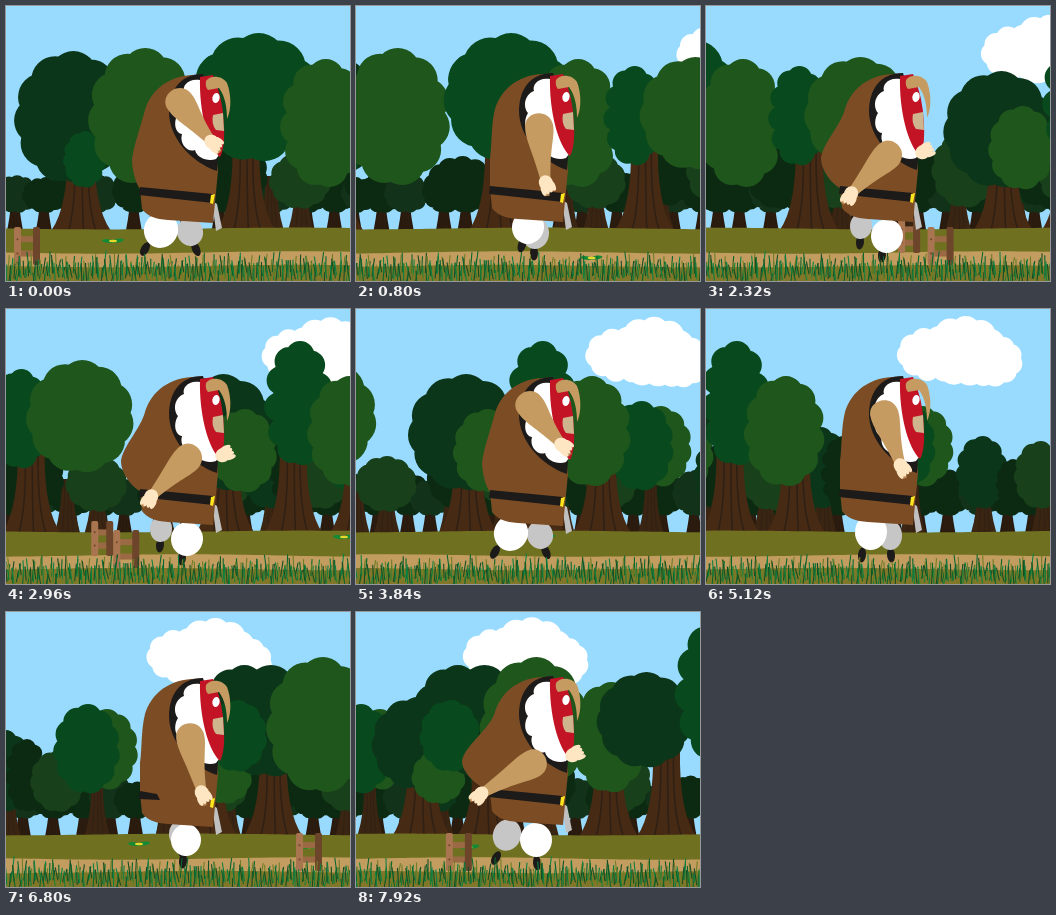
An HTML page with a canvas for the animation above (8 s loop, 344x275 px).

```html
<!DOCTYPE html>
<html lang="en">
<head>
<meta charset="utf-8">
<title>Walking gnome</title>
<style>
html, body { margin: 0; width: 100%; height: 100%; overflow: hidden; background: #99dbff; }
canvas { display: block; }
</style>
</head>
<body>
<canvas id="stage" width="344" height="275"></canvas>
<script>
const g = document.getElementById('stage').getContext('2d');
const W = 344, H = 275, LOOP = 8000, STEP = 80, POSE_MS = 78.6;
const DARK = '#0b3619', GREEN = '#084a1d', LEAF = '#1f561c', SHADE = '#0c2a12', MOSS = '#18401a';
const BROWN = '#7c4d25', TAN = '#c69b62', SKIN = '#ffe6c2', BLACK = '#1d1a1a';

// repeatable random numbers in 0..1
const rnd = n => { const v = Math.sin(n * 127.1 + 11.7) * 43758.5453; return v - Math.floor(v); };

function path(d, color) { g.fillStyle = color; g.fill(new Path2D(d)); }

function oval(x, y, rx, ry, color, turn = 0) {
  g.fillStyle = color;
  g.beginPath();
  g.ellipse(x, y, rx, ry, turn, 0, 7);
  g.fill();
}

// scalloped cloud shape filling the given box
function blob(x0, x1, y0, y1, color) {
  const cx = (x0 + x1) / 2, cy = (y0 + y1) / 2, rx = (x1 - x0) / 2, ry = (y1 - y0) / 2;
  const r = Math.min(rx, ry) * 0.42;
  g.fillStyle = color;
  g.beginPath();
  g.ellipse(cx, cy, rx - r * 0.6, ry - r * 0.6, 0, 0, 7);
  for (let i = 0; i < 11; i++) {
    const a = i * Math.PI * 2 / 11 - 1.5;
    const x = cx + Math.cos(a) * (rx - r), y = cy + Math.sin(a) * (ry - r);
    g.moveTo(x + r, y);
    g.arc(x, y, r, 0, 7);
  }
  g.fill();
}

function trunk(x, w, top, color) {
  const b = 225;
  path(`M${x - w * .45} ${top}L${x + w * .45} ${top}Q${x + w * .4} 200 ${x + w} ${b}L${x - w} ${b}Q${x - w * .4} 200 ${x - w * .45} ${top}Z`, color);
  g.strokeStyle = '#2f2015';
  g.lineWidth = w > 15 ? 1.5 : .7;
  for (const k of [-.25, .05, .3]) {
    g.beginPath();
    g.moveTo(x + k * w * .8, top);
    g.quadraticCurveTo(x + k * w * .6, 195, x + k * w * 1.6, b - 2);
    g.stroke();
  }
}

// canopies: left, right, top, bottom, colour (positions at time zero)
const frontTrees = [
  [8, 122, 45, 178, DARK], [57, 100, 125, 182, GREEN], [82, 192, 42, 180, LEAF],
  [188, 245, 45, 130, DARK], [185, 315, 27, 156, GREEN], [274, 362, 53, 182, LEAF],
  [345, 405, 60, 160, GREEN], [381, 489, 51, 164, LEAF],
  [520, 632, 65, 182, DARK], [565, 632, 100, 184, LEAF], [619, 688, 32, 157, GREEN], [662, 743, 67, 178, LEAF],
  [981, 1070, 85, 178, DARK], [1021, 1110, 53, 165, DARK], [1021, 1075, 138, 192, LEAF],
  [1034, 1149, 53, 165, DARK], [1029, 1090, 88, 160, GREEN], [1089, 1198, 45, 181, LEAF],
  [1181, 1257, 70, 181, LEAF], [1206, 1302, 60, 156, DARK], [1284, 1370, 8, 150, GREEN]
];
const frontTrunks = [75, 240, 386, 580, 648, 714, 1031, 1096, 1218, 1276];
const midTrees = [
  [125, 195, 150, 205, SHADE], [200, 262, 135, 203, SHADE], [263, 325, 147, 203, MOSS],
  [335, 395, 135, 200, SHADE], [385, 452, 125, 202, MOSS], [437, 495, 118, 200, DARK],
  [467, 509, 127, 200, SHADE], [492, 547, 138, 200, MOSS], [535, 600, 97, 178, LEAF],
  [515, 582, 92, 182, GREEN], [602, 654, 127, 200, DARK], [642, 675, 150, 200, SHADE], [660, 712, 132, 200, MOSS],
  [705, 765, 140, 202, SHADE], [780, 840, 138, 200, MOSS]
];
const midTrunks = [265, 295, 360, 412, 470, 559, 630, 690, 735, 810];

function forest(shift, trees, trunks, w, top, color) {
  g.save();
  g.translate(-shift, 0);
  const near = (a, b) => b > shift - 40 && a < shift + W + 40;
  trunks.filter(x => near(x, x)).forEach(x => trunk(x, w, top, color));
  trees.filter(t => near(t[0], t[1])).forEach(t => blob(...t));
  g.restore();
}

const backTrees = [], backTrunks = [];
for (let i = 0; i < 28; i++) {
  const x = i * 29 - 20 + rnd(i) * 10, top = 160 + rnd(i + 50) * 13;
  backTrees.push([x, x + 46, top, 207, i % 3 ? SHADE : '#12321a']);
  backTrunks.push(x + 22);
}

function ground(t) {
  const edge = (y, amp, shift) => {
    let d = `M0 ${H}`;
    for (let x = 0; x <= W; x += 8) d += `L${x} ${y + amp * Math.sin((x + shift) / 62)}`;
    return d + `L${W} ${H}Z`;
  };
  path(edge(222.5, .9, t * .13), '#707021');
  path(edge(246.5, 1.2, t * .17), '#c39d60');
  path(edge(260, 1.2, t * .185), '#827729');
}

function flower(x, y) {
  oval(x - 5, y, 6, 1.8, '#138b36', .12);
  oval(x + 5, y - .4, 6, 1.8, '#138b36', -.15);
  oval(x, y, 4, 1.2, '#e5d92a');
}

function fence(x, y, w, h) {
  g.fillStyle = '#9c6945';
  for (const k of [.24, .62]) g.fillRect(x + 2, y + h * k, w - 4, 6);
  g.fillStyle = '#a87550';
  for (const px of [x, x + w - 7]) {
    g.beginPath();
    g.roundRect(px, y, 7, h, 2);
    g.fill();
    oval(px + 3.5, y + h * .32, 1, 1, '#6c452b');
    oval(px + 3.5, y + h * .7, 1, 1, '#6c452b');
  }
}

function blades(t) {
  const span = 400, shift = t * .19;
  const colors = ['#08662d', '#0e8040', '#6f7d26', '#174d24'];
  g.lineWidth = 1.1;
  for (let i = 0; i < 330; i++) {
    const x = (((i * 1.213 - shift) % span) + span) % span - 20;
    const base = 266 + rnd(i + 9) * 12, h = 9 + rnd(i + 400) * 13;
    g.strokeStyle = colors[i % 4];
    g.beginPath();
    g.moveTo(x, base);
    g.lineTo(x + (rnd(i + 70) - .5) * 6, base - h);
    g.stroke();
  }
}

// leg: centre, radii, foot, foot tilt
const poses = [
  { dy: 0, back: 126, arm: [173, 95, 206, 136], white: [155, 224, 17, 18, 139, 243, .5], grey: [184, 226, 13, 14, 190, 243, -.4] },
  { dy: -1, back: 134, arm: [178, 104, 195, 157], white: [165, 223, 16, 18, 156, 246, .1], grey: [184, 226, 12, 15, 185, 246, -.1] },
  { dy: -1, back: 134, arm: [183, 120, 190, 177], white: [172, 221, 16, 17, 166, 239, .3], grey: [179, 227, 14, 16, 178, 247, 0] },
  { dy: -2, back: 120, arm: [185, 138, 164, 187], white: [181, 222, 16, 18, 186, 241, -.3], grey: [161, 223, 14, 16, 157, 246, .2], far: 1 },
  { dy: -4, back: 106, arm: [178, 151, 125, 182], white: [180, 228, 16, 17, 181, 251, -.1], grey: [151, 223, 14, 16, 140, 246, .5], far: 1 },
  { dy: -1, back: 115, arm: [183, 148, 145, 188], white: [181, 230, 16, 17, 176, 249, .1], grey: [155, 220, 11, 13, 154, 236, .1], far: 1 },
  { dy: -2, back: 134, arm: [184, 124, 196, 181], white: [180, 228, 15, 16, 177, 249, .1], grey: [175, 222, 12, 14, 176, 238, 0], cape: 1 },
  { dy: -1, back: 131, arm: [178, 107, 204, 157], white: [166, 227, 16, 17, 158, 248, .2], grey: [182, 222, 13, 15, 187, 241, -.3] }
];

function leg([x, y, rx, ry, fx, fy, tilt], color) {
  oval(fx, fy, 4, 7.5, BLACK, tilt);
  oval(x, y, rx, ry, color, tilt * .7);
}

function hand(x, y, turn) {
  g.save();
  g.translate(x, y);
  g.rotate(turn);
  oval(0, 0, 8, 7, SKIN);
  for (let i = 0; i < 4; i++) oval(6, -5 + i * 3.6, 5, 2.3, SKIN, .1);
  g.restore();
}

function arm([sx, sy, hx, hy]) {
  const a = Math.atan2(hy - sy, hx - sx);
  const len = Math.hypot(hx - sx, hy - sy);
  g.save();
  g.translate(sx, sy);
  g.rotate(a);
  path(`M0 -14C12 -15 22 -8 ${len - 3} -5L${len - 3} 5C22 10 12 15 0 14C-17 13 -17 -12 0 -14Z`, TAN);
  path(`M${len} -3L${len + 13} -2L${len + 13} 3L${len} 4Z`, '#b98752');
  g.restore();
  hand(hx, hy, a - .35);
}

function gnome(p) {
  const b = p.back;
  leg(p.grey, '#c6c6c6');
  leg(p.white, '#fff');
  g.save();
  g.translate(0, p.dy);
  path('M206 195L211 198L216 222L210 225Z', '#c0c0c0');
  path(`M196 69C166 67 146 82 139 104C135 120 ${b + 2} 138 ${b} 153C${b} 164 ${(b + 134) / 2} 178 134 183L136 203Q143 213 162 214L207 217L212 165L205 100Z`, BROWN);
  path(p.cape ? 'M134 181L151 184L154 190L133 189Z' : 'M134 181L207 188L207 197L133 189Z', BLACK);
  path('M205 189L209 188L207 198L204 197Z', '#ffe51c');
  path('M197 68C173 68 163 86 163 106C163 131 184 156 211 165L212 151L202 84Z', BLACK);
  path('M194 74C182 72 176 80 178 86C168 90 167 102 172 108C167 116 169 127 176 128C173 138 182 147 189 144C191 152 202 156 210 153L216 145Z', '#fff');
  path('M194 71L207 69Q217 91 218 120Q219 142 214 151C202 140 193 106 194 71Z', '#c31425');
  oval(210, 92, 3.6, 5, '#fff', .2);
  path('M207 109L217 107L218 125L210 124Q205 118 207 109Z', '#ceb58d');
  path('M200 75C204 69 216 69 221 77C225 87 226 103 221 113C221 101 219 90 213 82L202 84Q199 81 200 75Z', TAN);
  if (p.far) hand(217, 147, -.5);
  g.restore();
  arm(p.arm);
}

function draw(t) {
  g.fillStyle = '#99dbff';
  g.fillRect(0, 0, W, H);

  const cx = 344.4 - t * .03, cy = 10 - t * .0006;
  blob(cx, cx + 82, cy + 10, cy + 66, '#fff');
  blob(cx + 24, cx + 110, cy, cy + 70, '#fff');
  blob(cx + 62, cx + 126, cy + 18, cy + 71, '#fff');

  forest(t * .05, backTrees, backTrunks, 8, 185, '#2a1a0e');
  forest(t * .0688, midTrees, midTrunks, 13, 170, '#3a2412');
  forest(t * .1219, frontTrees, frontTrunks, 30, 135, '#472a13');

  ground(t);
  for (const [x, y, at] of [[107, 235, 0], [86, 252, 1680], [338, 228, 2960], [133, 232, 6800], [303, 235, 6800]])
    flower(x - (t - at) * .17, y);
  fence(299 - (t - 1680) * .167, 212, 22, 35);
  for (const [x, at] of [[8, 0], [336, 1680], [290, 6800]])
    fence(x - (t - at) * .1787, 221, 26, 38);

  gnome(poses[Math.floor(t / POSE_MS) % 8]);
  blades(t);
}

function tick() {
  draw(Math.floor(performance.now() % LOOP / STEP) * STEP);
  requestAnimationFrame(tick);
}
tick();
</script>
</body>
</html>
```
